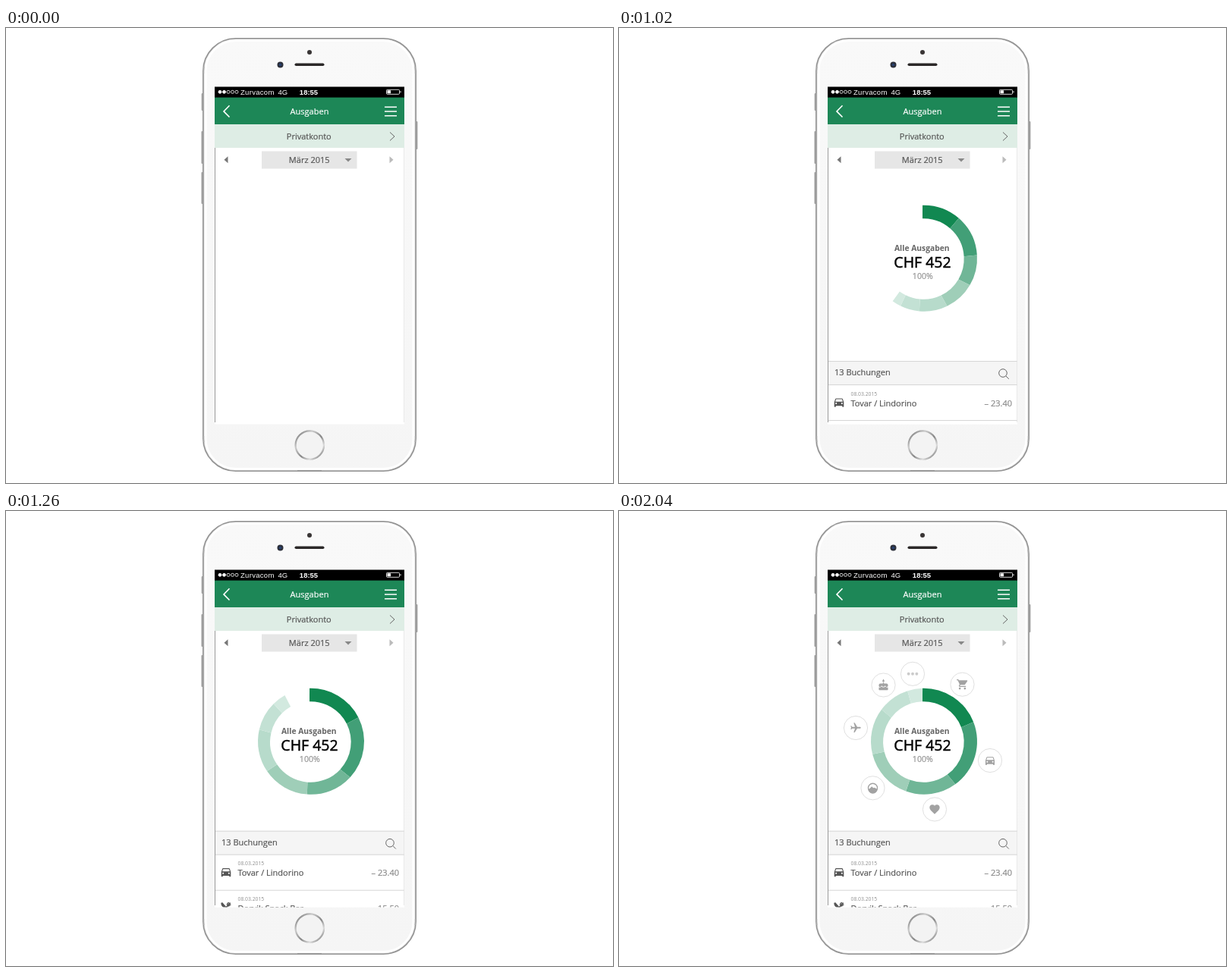
An HTML page that plays this animation: 800 px wide and 600 px high, repeating every 4080 ms.

```html
<!DOCTYPE html>
<html lang="de">
<head>
<meta charset="utf-8">
<title>Ausgaben</title>
<style>
  html, body { margin: 0; width: 100%; height: 100%; overflow: hidden; background: #fff; }
  svg { display: block; width: 800px; height: 600px; }
  text { font: 11px "Open Sans", "Noto Sans", sans-serif; color: #555; fill: currentColor; stroke: currentColor; stroke-width: .2; }
  .status text { font: 9.5px "Liberation Sans", Arial, sans-serif; color: #fff; stroke: none; }
  .mid { text-anchor: middle; }
  .end { text-anchor: end; color: #888; }
  .date { font-size: 6.8px; color: #909090; stroke: none; }
  .line { fill: none; stroke: #666; }
</style>
</head>
<body>
<svg viewBox="0 0 800 600">
  <defs>
    <linearGradient id="metal" x2="1" y2="1">
      <stop offset="0" stop-color="#666"/>
      <stop offset=".3" stop-color="#ccc"/>
      <stop offset=".55" stop-color="#858585"/>
      <stop offset=".75" stop-color="#ddd"/>
      <stop offset="1" stop-color="#555"/>
    </linearGradient>
    <linearGradient id="face" x2="0" y2="1">
      <stop offset="0" stop-color="#f9f9f9"/>
      <stop offset="1" stop-color="#f5f5f5"/>
    </linearGradient>
    <clipPath id="screen"><rect x="275" y="77.600" width="250" height="444.900"/></clipPath>

    <path id="car" fill-rule="evenodd" d="M19 6Q18.600 5 17.500 5h-11Q5.400 5 5 6L3 12v8q0 1 1 1h1q1 0 1-1v-1h12v1q0 1 1 1h1q1 0 1-1v-8zM6.500 6.500h11L19 11H5zM5 14.500a1.500 1.500 0 1 1 3 0a1.500 1.500 0 1 1-3 0M16 14.500a1.500 1.500 0 1 1 3 0a1.500 1.500 0 1 1-3 0"/>
    <g id="cart">
      <path d="M1 2h3.300l1 2H21q1.500.2.800 1.600L17.300 12q-.6 1-1.800 1H8.100L7 15h12v2H7q-3-.4-1.700-3l1.300-2.400L3 4H1z"/>
      <circle cx="7" cy="20" r="2"/><circle cx="17" cy="20" r="2"/>
    </g>
    <path id="heart" d="M12 21.300L10.500 20C5.400 15.400 2 12.300 2 8.500C2 5.400 4.400 3 7.500 3Q10.300 3 12 5.100Q13.700 3 16.500 3C19.600 3 22 5.400 22 8.500C22 12.300 18.600 15.400 13.500 20z"/>
    <g id="hills">
      <circle cx="12" cy="12" r="9" fill="none" stroke="#a2a2a2" stroke-width="2"/>
      <path d="M3 14l3-1 4-4 3 3 2-1 6 3a9 9 0 0 1-18 0z"/>
    </g>
    <path id="plane" transform="rotate(90 12 12)" d="M21 16v-2l-8-5V3.500a1.500 1.500 0 0 0-3 0V9l-8 5v2l8-2.500V19l-2 1.500V22l3.500-1 3.500 1v-1.500L13 19v-5.500z"/>
    <g id="cake">
      <path d="M12 0l1.700 3a2 2 0 1 1-3.400 0zM11 7h2v2h5q3 0 3 3v2q-2 3-4 1l-1.500-2-2 2q-1.500 1-3 0l-2-2L7 15q-3 2-4-1v-2q0-3 3-3h5z"/>
      <path d="M3 16.500q2.500 1 4.500-1l1-.7q3.500 3.500 7 0l1 .7q2 2 4.500 1V21q0 1-1 1H4q-1 0-1-1z"/>
    </g>
    <g id="dots" fill="#cbcbcb"><circle cx="4" cy="12" r="2.900"/><circle cx="12" cy="12" r="2.900"/><circle cx="20" cy="12" r="2.900"/></g>
    <g id="cutlery" fill="none" stroke="#555" stroke-width="2.600">
      <path d="M4 4l15 17M20 4L5 21"/><path d="M17 3l-3 4 3 3 4-3" stroke-width="2"/><path d="M4 4q-1 5 5 8" fill="#555"/>
    </g>
  </defs>

  <g id="phone">
    <g fill="#a6a6a6">
      <rect x="257.600" y="86" width="2" height="23" rx="1"/>
      <rect x="257.400" y="136" width="2" height="43" rx="1"/>
      <rect x="257.400" y="190" width="2" height="42" rx="1"/>
      <rect x="540.500" y="123" width="2" height="37" rx="1"/>
    </g>
    <rect x="259.800" y="13.800" width="280.400" height="570.400" rx="43" fill="#dcdcdc" stroke="#939393" stroke-width="1.600"/>
    <g fill="#c0c0c0">
      <rect x="260.500" y="51" width="3" height="9"/><rect x="536.500" y="51" width="3" height="9"/>
      <rect x="260.500" y="538" width="3" height="8"/><rect x="536.500" y="538" width="3" height="8"/>
    </g>
    <rect x="263" y="16.500" width="274" height="565" rx="40" fill="url(#face)" stroke="#fff" stroke-width="3"/>
    <path d="M384 583.500h32" stroke="#999"/>
    <circle cx="400" cy="32" r="3" fill="#393535"/>
    <circle cx="361.500" cy="48.500" r="4" fill="#2c2f3a"/>
    <circle cx="361.500" cy="48.500" r="1.800" fill="#27406f"/>
    <rect x="380.500" y="46.500" width="39" height="3.600" rx="1.800" fill="#2b2828"/>
    <circle cx="400.300" cy="550" r="18.700" fill="#f3f3f3" stroke="url(#metal)" stroke-width="2.300"/>
  </g>

  <g clip-path="url(#screen)">
    <rect x="275" y="77" width="250" height="446" fill="#fff"/>

    <g class="status">
      <rect x="275" y="77" width="250" height="15"/>
      <g id="signal" stroke="#fff" stroke-width=".8"></g>
      <text x="309" y="87.700" letter-spacing=".3">Zurvacom</text>
      <text x="358.500" y="87.700">4G</text>
      <text x="399" y="87.700" class="mid" style="font-weight:700">18:55</text>
      <rect x="501.500" y="81.300" width="17" height="6" rx="1" fill="none" stroke="#eee" stroke-width=".9"/>
      <path d="M502.500 82.300h4.500v4h-4.500zM519.500 83.300h1v2h-1z" fill="#fff"/>
    </g>

    <rect x="275" y="91.600" width="250" height="35.400" fill="#1d8757"/>
    <path d="M294.500 102.300L287 109.900l7.500 7.600M499 104.200h16M499 110h16M499 115.800h16" fill="none" stroke="#fff" stroke-width="1.600"/>
    <text x="400" y="113.800" class="mid" style="color:#fff">Ausgaben</text>

    <rect x="275" y="127" width="250" height="31" fill="#deede5"/>
    <text x="399.300" y="146.700" class="mid">Privatkonto</text>
    <path class="line" d="M506 137.500l6 5.500-6 5.500"/>

    <rect x="337" y="162.500" width="125.500" height="23" fill="#e6e6e6"/>
    <text x="399.700" y="177.500" class="mid">März 2015</text>
    <path d="M446.500 172h9l-4.500 4.600z" fill="#888"/>
    <path d="M292.500 169.300v9l-5-4.500z" fill="#777"/>
    <path d="M505.500 169.300v9l5-4.500z" fill="#bbb"/>

    <g id="ring"></g>

    <g id="total">
      <text x="399.300" y="293.500" class="mid" style="font-size:10.300px;font-weight:700;color:#666;stroke:none">Alle Ausgaben</text>
      <text x="400" y="315.600" class="mid" style="font-size:19.500px;color:#000;stroke-width:.45">CHF 452</text>
      <text x="400.300" y="330.700" class="mid" style="font-size:10.600px;color:#939393">100%</text>
    </g>

    <g id="bubbles" fill="#a2a2a2"></g>

    <g id="panel">
      <rect x="275" width="250" height="120" fill="#fff"/>
      <rect x="275" width="250" height="31.500" fill="#f5f5f5"/>
      <path d="M275 .5h250M275 31.500h250M275 78.500h250" stroke="#d6d6d6"/>
      <text x="284" y="19.300">13 Buchungen</text>
      <circle class="line" cx="506" cy="16" r="5.300"/>
      <path class="line" d="M509.800 19.800l4 4"/>
      <g id="rows" fill="#555"></g>
    </g>

    <path d="M275.500 158V520" stroke="#9b9b9b"/>
    <path d="M524.700 158V520" stroke="#dedede" stroke-width=".8"/>
  </g>
</svg>

<script>
  const LOOP = 4080, STEP = 30;
  const OUTER = { x: 402, y: 303.8, r: 70, start: -1.6 };
  const INNER = { x: 401.4, y: 304.5, r: 53.3, start: -1.5 };
  const PANEL_TOP = 421.7, PANEL_TRAVEL = 170;

  const slices = [
    [70.2, '#118851'], [75.3, '#429f77'], [56, '#70b697'], [56, '#9fceb8'],
    [51, '#b7dbcb'], [35, '#c3e1d4'], [16.5, '#d2e9df']
  ];
  const bubbles = [
    ['dots', 387, 214.8], ['cart', 452.5, 228.7], ['car', 489, 329], ['heart', 416, 393.4],
    ['hills', 334.5, 365.3], ['plane', 312, 286], ['cake', 348.5, 229.5]
  ];
  const rows = [
    ['car', 'Tovar / Lindorino', '– 23.40'],
    ['cutlery', 'Dorvik Snack Bar', '– 15.50']
  ];

  const $ = id => document.getElementById(id);
  const clamp = v => Math.min(1, Math.max(0, v));
  const progress = (t, from, length) => clamp((t - from) / length);

  const icon = (name, x, y, scale) =>
    `<use href="#${name}" transform="translate(${x} ${y}) scale(${scale}) translate(-12 -12)"/>`;

  function bezier(x1, y1, x2, y2) {
    const at = (a, b, s) => 3 * a * s * (1 - s) ** 2 + 3 * b * (1 - s) * s * s + s ** 3;
    return x => {
      let low = 0, high = 1;
      for (let i = 0; i < 24; i++) {
        const s = (low + high) / 2;
        if (at(x1, x2, s) < x) low = s; else high = s;
      }
      return at(y1, y2, high);
    };
  }
  const sweepEase = bezier(.18, .12, .3, 1);
  const panelEase = bezier(.25, .1, .25, 1);

  function point(circle, degrees) {
    const a = (circle.start + degrees) * Math.PI / 180;
    const x = circle.x + circle.r * Math.sin(a), y = circle.y - circle.r * Math.cos(a);
    return `${x.toFixed(2)} ${y.toFixed(2)}`;
  }

  const slicePath = (from, to) =>
    `M${point(OUTER, from)}A${OUTER.r} ${OUTER.r} 0 0 1 ${point(OUTER, to)}` +
    `L${point(INNER, to)}A${INNER.r} ${INNER.r} 0 0 0 ${point(INNER, from)}z`;

  $('signal').innerHTML = [0, 1, 2, 3, 4].map(i =>
    `<circle cx="${282 + i * 5.5}" cy="84.300" r="2" fill="${i < 2 ? '#fff' : 'none'}"/>`).join('');
  $('ring').innerHTML = slices.map(([, color]) => `<path fill="${color}"/>`).join('');
  $('bubbles').innerHTML = bubbles.map(([name, x, y]) =>
    `<circle cx="${x}" cy="${y}" r="15.600" fill="#fff" stroke="#e0e0e0"/>` + icon(name, x, y, .67)).join('');
  $('rows').innerHTML = rows.map(([name, shop, amount], i) =>
    `<g transform="translate(0 ${i * 46.3})">${icon(name, 290, 54.3, .7)}
      <text x="305.500" y="45.700" class="date">08.03.2015</text>
      <text x="305.500" y="59.500">${shop}</text>
      <text x="518" y="59.500" class="end">${amount}</text></g>`).join('');

  const slicePaths = [...$('ring').children];

  function draw(t) {
    const sweep = t < 810 ? 0 : sweepEase(progress(t, 770, 730));
    let angle = 0;
    slices.forEach(([size], i) => {
      const next = angle + size * sweep;
      slicePaths[i].setAttribute('d', sweep ? slicePath(angle, next) : '');
      angle = next;
    });
    $('total').setAttribute('opacity', progress(t, 780, 180));
    $('bubbles').setAttribute('opacity', progress(t, 1860, 180));
    const hidden = PANEL_TRAVEL * (1 - panelEase(progress(t, 797, 360)));
    $('panel').setAttribute('transform', `translate(0 ${(PANEL_TOP + hidden).toFixed(2)})`);
  }

  const begin = performance.now();
  function tick() {
    const t = (performance.now() - begin) % LOOP;
    draw(Math.floor(t / STEP) * STEP);
    requestAnimationFrame(tick);
  }
  draw(0);
  requestAnimationFrame(tick);
</script>
</body>
</html>
```
